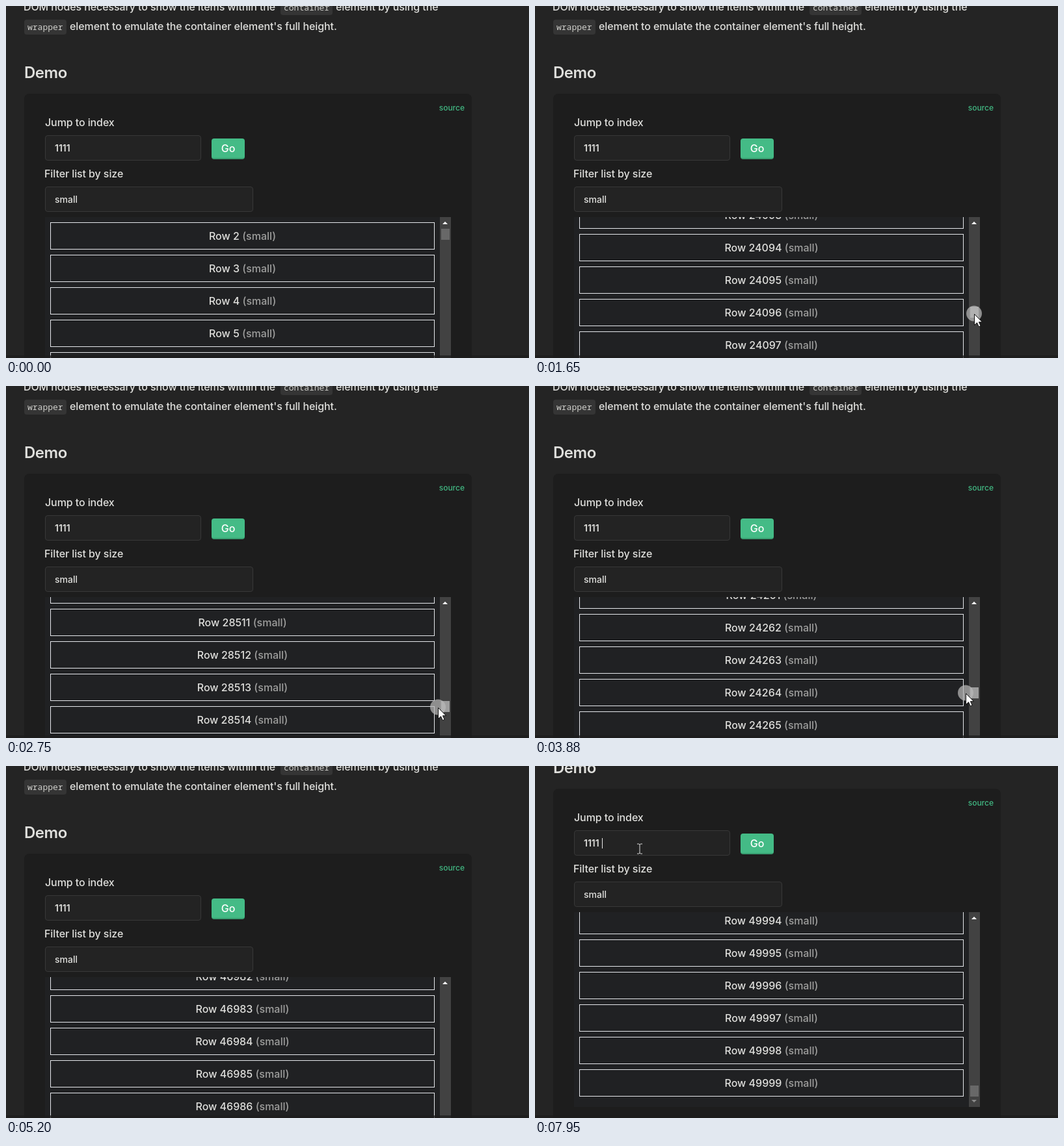
An HTML page for the animation above (8000 ms loop, 804 by 542 pixels).

```html
<!DOCTYPE html>
<html lang="en">
<head>
<meta charset="utf-8">
<title>Virtual list demo</title>
<style>
  html, body { margin: 0; width: 804px; height: 542px; overflow: hidden; background: #242424; }
  body { position: relative; font: 500 16px/24px Inter, sans-serif; color: #dfdfdc; }
  body div, .text { position: absolute; box-sizing: border-box; white-space: nowrap; }
  #page { inset: 0; }
  .text { letter-spacing: -.006em; }
  code { position: absolute; height: 23px; padding: 0 5px; border-radius: 4px; background: #353535;
    font: 13px/23px "Noto Sans Mono", monospace; color: #cfcfcb; }
  h2 { position: absolute; margin: 0; left: 28px; top: 87px; font: 600 24px/32px Inter, sans-serif; letter-spacing: -.02em; }
  .panel { left: 28px; top: 135px; width: 688px; height: 522px; border-radius: 8px; background: #1d1d1d; }
  .source { right: 99px; top: 145px; font-size: 12px; color: #42b883; }
  .input { left: 60px; height: 39px; padding-left: 14px; border: 1px solid #383838; border-radius: 4px;
    background: #232323; font-size: 14px; line-height: 37px; }
  .number { font-weight: 600; }
  .go { left: 316px; top: 204px; width: 51px; height: 32px; border-radius: 4px; border-bottom: 2px solid #389d70;
    background: #44bb86; color: #fff; line-height: 31px; text-align: center; }
  #list { left: 60px; top: 325px; width: 624px; height: 300px; overflow: hidden; background: #202123; }
  .row { left: 8px; top: 0; width: 591px; height: 42px; border: 1px solid #e5e7eb; line-height: 40px; text-align: center; }
  .row span { opacity: .66; }
  .bar { right: 0; top: 0; width: 17px; height: 300px; background: #424242; }
  #thumb { left: 2px; top: 18px; width: 13px; height: 17px; }
  .arrow { left: 4px; border: 4px solid transparent; width: 0; height: 0; }
  #up { top: 7px; border-top: 0; border-bottom-color: #fff; }
  #down { bottom: 7px; border-bottom: 0; border-top-color: #fff; }
  #caret { left: 103px; top: 211px; width: 1px; height: 16px; background: #e8e8e8; }
  .shade { left: 0; bottom: 0; width: 804px; height: 4px; background: #1d1d1d; opacity: .75; }
  svg { position: absolute; left: 0; top: 0; overflow: visible; }
</style>
</head>
<body>
<div id="page">
  <span class="text" style="left:27px;top:-11px">DOM nodes necessary to show the items within the</span>
  <code style="left:422px;top:-9px">container</code>
  <span class="text" style="left:507px;top:-11px">element by using the</span>
  <code style="left:28px;top:21px">wrapper</code>
  <span class="text" style="left:98px;top:19px">element to emulate the container element's full height.</span>
  <h2>Demo</h2>
  <div class="panel"></div>
  <div class="source">source</div>
  <span class="text" style="left:60px;top:167px">Jump to index</span>
  <div class="input number" style="top:199px;width:240px">1111</div>
  <div id="caret"></div>
  <div class="go">Go</div>
  <span class="text" style="left:59px;top:246px">Filter list by size</span>
  <div class="input" style="top:278px;width:320px">small</div>
  <div id="list">
    <div class="bar">
      <div id="up" class="arrow"></div>
      <div id="thumb"></div>
      <div id="down" class="arrow"></div>
    </div>
  </div>
</div>
<div class="shade"></div>
<svg id="pointer" width="1" height="1">
  <circle id="halo" cx="-.5" cy="-1" r="12" fill="#b9b9b9" fill-opacity=".72"/>
  <path id="arrow" d="M0 0V17L4 13.2L6.8 19.3L9.6 18L6.9 12.2H12Z" fill="#fff" stroke="#111"/>
  <path id="beam" d="M-3.5-7.5H-1L.5-6.5L2-7.5H4.5M.5-6.5V6.5M-3.5 7.5H-1L.5 6.5L2 7.5H4.5" fill="none" stroke="#ddd"/>
</svg>
<script>
const LOOP = 8000, STEP = 70, ROWS = 50000, PITCH = 50;
const MAX = ROWS * PITCH + 16 - 300, TRAVEL = 249;
const $ = id => document.getElementById(id);
const drag = px => Math.floor(px * MAX / TRAVEL);

// Moves: start, steps, then x, y, list scroll and page scroll at the end
const moves = [
  [70, 1, 742, 505, 100, 0],
  [140, 2, 648, 340, 100, 0],
  [280, 1, 613, 334, 100, 0],
  [480, 8, 673, 354, 200, 0],
  [1370, 5, 675, 474, drag(120), 0],
  [1850, 4, 672, 599, drag(246), 0],
  [2130, 1, 670, 602, MAX, 0],
  [2330, 7, 664, 495, drag(142), 0],
  [3080, 2, 663, 491, drag(138), 0],
  [3810, 9, 659, 352, drag(2), 0],
  [4440, 3, 660, 349, 0, 0],
  [4780, 7, 665, 585, drag(234), 0],
  [5270, 1, 665, 602, MAX, 0],
  [5670, 7, 541, 335, MAX, 100],
  [6350, 6, 113, 186, MAX, 100],
  [6770, 6, 356, 197, MAX, 100],
  [7190, 6, 162, 128, MAX, 100],
  [7950, 1, 160, 127, MAX, 100]
];

function stateAt(t) {
  let s = [742, 600, 100, 0];
  for (const [start, steps, ...end] of moves) {
    if (t < start) break;
    const p = Math.min(1, (Math.floor((t - start) / STEP) + 1) / steps);
    const e = p * p * (3 - 2 * p);
    s = s.map((v, i) => Math.round(v + (end[i] - v) * e));
    if (p < 1) break;
  }
  return s;
}

const rows = Array.from({ length: 8 }, () => {
  const row = document.createElement("div");
  row.className = "row";
  row.append("", document.createElement("span"));
  row.lastChild.textContent = "(small)";
  $("list").prepend(row);
  return row;
});

const within = (x, y, left, top, w) => x >= left && x < left + w && y >= top && y < top + 39;
const show = (el, on) => el.style.display = on ? "" : "none";

function draw(now) {
  const t = now % LOOP;
  const [x, y, scroll, page] = stateAt(t);
  const dragging = t >= 1300 && t < 5670;
  const first = Math.max(0, Math.floor(scroll / PITCH) - 1);

  rows.forEach((row, i) => {
    const n = first + i;
    show(row, n < ROWS);
    row.firstChild.data = `Row ${n} `;
    row.style.transform = `translateY(${8 + n * PITCH - scroll}px)`;
  });
  $("thumb").style.transform = `translateY(${Math.round(scroll / MAX * TRAVEL)}px)`;
  $("thumb").style.background = dragging ? "#9e9e9e" : "#686868";
  $("up").style.borderBottomColor = scroll > 0 ? "#fff" : "#8a8a8a";
  $("down").style.borderTopColor = scroll < MAX ? "#fff" : "#8a8a8a";
  $("page").style.transform = `translateY(${-page}px)`;

  const text = within(x, y + page, 60, 199, 240) || within(x, y + page, 60, 278, 320);
  $("pointer").style.transform = `translate(${x + .5}px, ${y + .5}px)`;
  show($("pointer"), t >= 70);
  show($("halo"), dragging || (t >= 7610 && t < 7750));
  show($("arrow"), !text);
  show($("beam"), text);
  show($("caret"), t >= 7610);
}

function tick() {
  draw(performance.now());
  requestAnimationFrame(tick);
}
tick();
</script>
</body>
</html>
```
